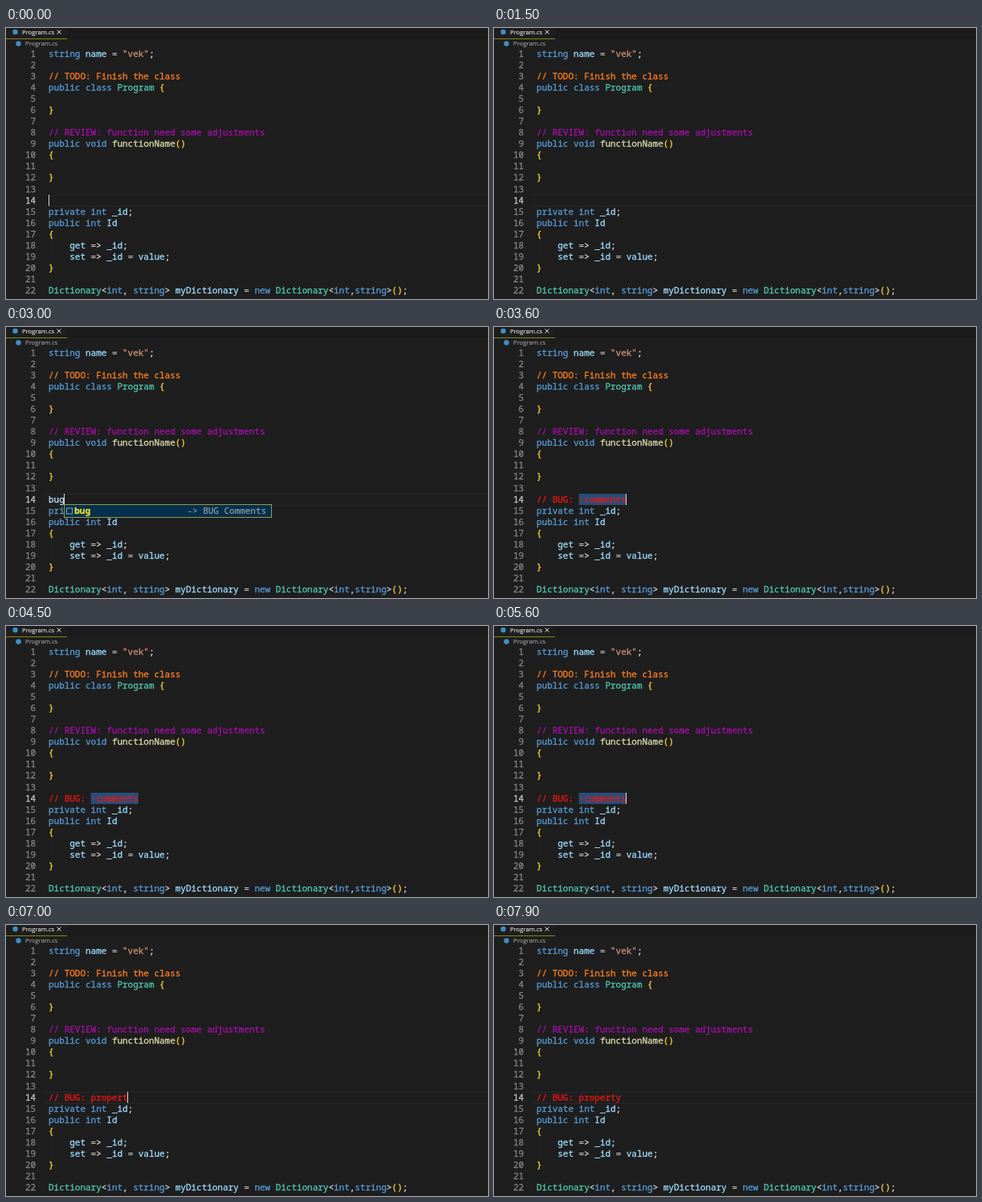
An HTML page for the animation above (8 s loop, 600 by 338 pixels).

```html
<!DOCTYPE html>
<html lang="en">
<head>
<meta charset="utf-8">
<title>Comment snippet</title>
<style>
  html, body { margin: 0; width: 100%; height: 100%; overflow: hidden; background: #1e1e1e; }
  svg { display: block; width: 600px; height: 338px; }
  text { white-space: pre; font: 10.96px "Noto Sans Mono", "DejaVu Sans Mono", monospace; color: #d8d8d8; }
  text, tspan { fill: currentColor; stroke: currentColor; stroke-width: .3px; }
  .ui { font: 7.7px "Open Sans", "Noto Sans", sans-serif; stroke-width: .1px; }
  .num { text-anchor: end; color: #858585; }
  .hit { color: #f0e030; font-weight: 700; }
  .info { color: #a3a8aa; stroke-width: .1px; }
</style>
</head>
<body>
<svg viewBox="0 0 600 338">
  <rect width="600" height="338" fill="#1e1e1e"/>
  <rect x="76" width="524" height="13" fill="#1b1b1b"/>
  <rect y="13" width="76" height="1" fill="#85821f"/>
  <circle cx="11.5" cy="5" r="3.2" fill="#3f8fc4"/>
  <text class="ui" x="20" y="8" style="color:#f0f0f0">Program.cs</text>
  <path d="M63.5 2.5l5 5m0-5l-5 5" stroke="#ddd"/>
  <circle cx="15.5" cy="19.5" r="3.2" fill="#3f8fc4"/>
  <text class="ui" x="24" y="22.3" style="color:#a5a5a5">Program.cs</text>
  <path d="M57.5 264v28" stroke="#2c2c2c" stroke-dasharray="1 1"/>
  <path id="active" d="M49 208.5H600M49 222.5H600" stroke="#272727"/>
  <g id="code"></g>
  <rect id="selection" x="105.6" y="208" width="59.2" height="14" fill="#264f78"/>
  <text id="typed" x="53" y="218.7"></text>
  <rect id="caret" y="208" width="1" height="14" fill="#d8d8d8"/>
  <g id="popup"></g>
</svg>
<script>
const LOOP = 8000, CHAR = 6.576, LEFT = 53, PITCH = 14.05;
const $ = id => document.getElementById(id);
const esc = s => s.replace(/&/g, '&amp;').replace(/</g, '&lt;');
const span = (s, color) => `<tspan style="color:${color}">${esc(s)}</tspan>`;

const code = `string name = "vek";

// TODO: Finish the class
public class Program {

}

// REVIEW: function need some adjustments
public void functionName()
{

}


private int _id;
public int Id
{
    get => _id;
    set => _id = value;
}

Dictionary<int, string> myDictionary = new Dictionary<int,string>();`.split('\n');

// One colour per capture group
const syntax = /(\/\/ TODO.*)|(\/\/ REVIEW.*)|(".*?")|\b(string|public|private|class|void|int|new)\b|\b(Program|Dictionary)\b|\b(functionName)\b|([{}()])|(\w+)|([^\w\s])/g;
const colors = ['#ff7f1a', '#a50fa8', '#ce9178', '#569cd6', '#4ec9b0', '#dcdcaa', '#ffd733', '#9cdcfe', '#d4d4d4'];
const paint = line => line.replace(syntax, (tok, ...groups) =>
  span(tok, colors[groups.findIndex(g => g !== undefined)]));

$('code').innerHTML = code.map((line, i) => {
  const y = 35.9 + i * PITCH;
  return `<text class="num" x="37.2" y="${y}"${i === 13 ? ' style="color:#c6c6c6"' : ''}>${i + 1}</text>` +
    `<text x="${LEFT}" y="${y}">${paint(line)}</text>`;
}).join('');

// Label, detail, detail offset
const items = [
  ['bug', '-> BUG Comments', 153],
  ['OnBecameInvisibl…', 'MonoBehaviour O…', 140],
  ['OnBecameInvisibl…', 'MonoBehaviour O…', 140],
  ['OnBecameVisibl…', 'MonoBehaviour OnB…', 130],
  ['OnBecameVisibl…', 'MonoBehaviour OnB…', 130],
  ['MonoBehaviour', 'Unity MonoBehaviour', 126],
  ['NetworkBehavio…', 'Unity NetworkBeha…', 130],
  ['OnJointBreak(flo…', 'MonoBehaviour O…', 143],
  ['OnMouseDrag', 'MonoBehaviour O…', 143]
];

const caretX = text => Math.floor(LEFT + text.length * CHAR);

function popup(query) {
  const rows = query === 'b' ? items : items.slice(0, 1);
  const list = rows.map(([label, detail, dx], i) => {
    const y = i * 14;
    const name = label.replace(new RegExp(query, 'i'), '<tspan class="hit">$&</tspan>');
    return `<rect x="3.5" y="${y + 4}" width="7" height="7" fill="none" stroke="${i ? '#8a8a8a' : '#75a9c4'}"/>` +
      `<text x="13.3" y="${y + 11.4}">${name}</text>` +
      `<text class="info" x="${dx + .5}" y="${y + 11.4}">${detail}</text>`;
  }).join('');
  return `<g transform="translate(${caretX(query)} 222)">
    <rect x=".5" y="-.5" width="258" height="${rows.length * 14 + 2}" fill="#202021" stroke="#8f9a45"/>
    <rect x="1" width="257" height="15" fill="#06304d"/>${list}</g>`;
}

// Key presses: time and resulting line text
const PREFIX = '// BUG: ', SNIPPET = PREFIX + '·comments';
const keys = [[-200, ''], [2700, 'b'], [2800, 'bu'], [2900, 'bug'], [3600, SNIPPET]];
[6200, 6400, 6500, 6600, 6800, 6900, 7000, 7200, 7400].forEach((at, i) =>
  keys.push([at, PREFIX + 'property '.slice(0, i + 1)]));

const show = (id, on) => $(id).setAttribute('visibility', on ? 'visible' : 'hidden');
let last;

function frame(now) {
  const t = now % LOOP;
  const [at, text] = keys.findLast(k => k[0] <= t);
  if (text !== last) {
    last = text;
    $('typed').innerHTML = span(text, text.startsWith('//') ? '#f01414' : '#b8dcf2');
    $('caret').setAttribute('x', caretX(text));
    $('popup').innerHTML = text.startsWith('b') ? popup(text) : '';
    show('selection', text === SNIPPET);
    show('active', text !== SNIPPET);
  }
  show('caret', Math.floor((t - at) / 500) % 2 === 0);
  requestAnimationFrame(() => frame(performance.now()));
}
frame(performance.now());
</script>
</body>
</html>
```
